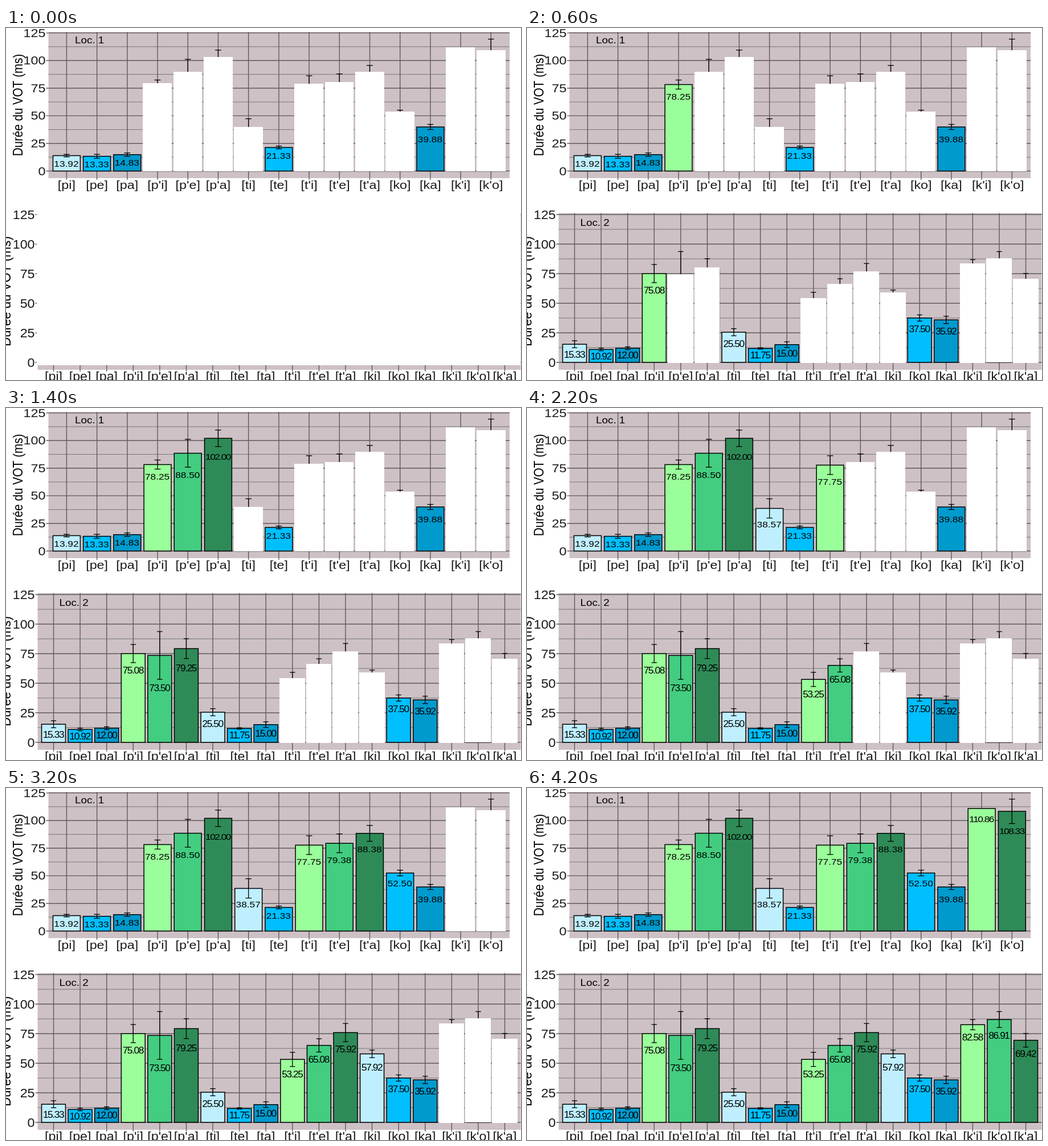
Animation, 904 px wide and 619 px high, one loop 4.4 s. Source, as an HTML page with a canvas:

```html
<!DOCTYPE html>
<html lang="fr">
<head>
<meta charset="utf-8">
<title>Durée du VOT</title>
<style>
  html, body { margin: 0; height: 100%; overflow: hidden; background: #fff; }
  canvas { display: block; }
</style>
</head>
<body>
<canvas id="stage" width="904" height="619"></canvas>
<script>
const ctx = document.getElementById('stage').getContext('2d');
const STEP = 200, LOOP = 4400;
const PLAIN = ['#bfefff', '#00bfff', '#009acd'];
const EJECTIVE = ['#9aff9a', '#43cd80', '#2e8b57'];
const SHADE = { i: 0, e: 1, o: 1, a: 2 };

// bars: syllable, mean, error half-height (px), label offset below top (px), reveal step, shade
const charts = [
  {
    title: 'Loc. 1', titleX: 121, titleY: 27, start: 0,
    left: 74.5, right: 884, top: 7, bottom: 264, base: 251.5, unit: 1.943,
    firstX: 106.4, pitch: 53.21, coverBottom: 252,
    stretch: 1.15, tickSize: 20.3, valueSize: 15, titleSize: 16.4, spacing: 0,
    axisSize: 20.6, axisX: 28.5, axisY: 135.5, tickX: 69.5, nameY: 282.5,
    bars: [
      ['pi', 13.92, 2.2, 14], ['pe', 13.33, 3.5, 14], ['pa', 14.83, 3, 14],
      ["p'i", 78.25, 8, 21, 3], ["p'e", 88.5, 24.5, 38, 5], ["p'a", 102, 14.5, 32, 7],
      ['ti', 38.57, 17, 28, 8], ['te', 21.33, 2.5, 15],
      ["t'i", 77.75, 16.5, 29.5, 10], ["t'e", 79.38, 16.5, 29, 12], ["t'a", 88.38, 14, 27.5, 14],
      ['ko', 52.5, 5, 18, 16], ['ka', 39.88, 4.5, 21.5],
      ["k'i", 110.86, 0, 18.5, 18], ["k'o", 108.33, 21.5, 35, 20, 2]
    ]
  },
  {
    title: 'Loc. 2', titleX: 93.5, titleY: 348, start: 1,
    left: 55.5, right: 903.5, top: 325.5, bottom: 601, base: 588, unit: 2.08,
    firstX: 83.5, pitch: 46.59, coverBottom: 589,
    stretch: 1.08, tickSize: 21.5, valueSize: 16, titleSize: 17.4, spacing: -1.3,
    axisSize: 22.2, axisX: 8, axisY: 463, tickX: 50.5, nameY: 619.5,
    bars: [
      ['pi', 15.33, 6.2, 18], ['pe', 10.92, 2.3, 12], ['pa', 12, 2.5, 12.5],
      ["p'i", 75.08, 16, 30, 2], ["p'e", 73.5, 42, 57, 4], ["p'a", 79.25, 17.5, 34, 6],
      ['ti', 25.5, 6.3, 20], ['te', 11.75, 1.2, 11.5], ['ta', 15, 5, 16],
      ["t'i", 53.25, 12.5, 26, 9], ["t'e", 65.08, 11.7, 25, 11], ["t'a", 75.92, 16, 29, 13],
      ['ki', 57.92, 6.7, 23.5, 15], ['ko', 37.5, 5.5, 19], ['ka', 35.92, 6.5, 20.5],
      ["k'i", 82.58, 9, 22, 17], ["k'o", 86.91, 14, 28, 19], ["k'a", 69.42, 12, 23.5, 21]
    ]
  }
];

function line(x1, y1, x2, y2, color, width) {
  ctx.strokeStyle = color;
  ctx.lineWidth = width;
  ctx.beginPath();
  ctx.moveTo(x1, y1);
  ctx.lineTo(x2, y2);
  ctx.stroke();
}

function rect(x1, y1, x2, y2, color) {
  ctx.fillStyle = color;
  ctx.fillRect(x1, y1, x2 - x1, y2 - y1);
}

function text(chart, str, x, y, size, { align = 'center', spacing = 0, angle = 0, color = '#000' } = {}) {
  ctx.save();
  ctx.translate(x, y);
  ctx.scale(chart.stretch, 1);
  ctx.rotate(angle);
  ctx.font = `${size}px "Liberation Sans", Arial, sans-serif`;
  ctx.letterSpacing = spacing + 'px';
  ctx.textAlign = align;
  ctx.fillStyle = color;
  ctx.fillText(str, 0, 0);
  ctx.restore();
}

function drawPanel(c) {
  const yAt = v => c.base - v * c.unit;
  rect(c.left, c.top, c.right, c.bottom, '#cdc1c5');
  for (let v = 12.5; v < 125; v += 25) line(c.left, yAt(v), c.right, yAt(v), '#777', 1);
  for (let v = 0; v <= 125; v += 25) {
    line(c.left - 4, yAt(v), c.right, yAt(v), '#5e5a5c', 1.4);
    text(c, String(v), c.tickX, yAt(v) + c.tickSize * 0.35, c.tickSize, { align: 'right', color: '#1a1a1a' });
  }
  c.bars.forEach(([name], i) => {
    const x = c.firstX + i * c.pitch;
    line(x, c.top, x, c.bottom + 3, '#5e5a5c', 1.4);
    text(c, `[${name}]`, x, c.nameY, c.tickSize, { color: '#1a1a1a' });
  });
  text(c, c.title, c.titleX, c.titleY, c.titleSize, { align: 'left' });
  text(c, 'Durée du VOT (ms)', c.axisX, c.axisY, c.axisSize, { angle: -Math.PI / 2 });
}

function drawBar(c, [name, mean, error, offset, , shade = SHADE[name.at(-1)]], x) {
  const y = c.base - mean * c.unit, half = c.pitch * 0.45, cap = c.pitch * 0.1;
  rect(x - half, y, x + half, c.base, (name.includes("'") ? EJECTIVE : PLAIN)[shade]);
  ctx.strokeStyle = '#000';
  ctx.lineWidth = 1.5;
  ctx.strokeRect(x - half, y, half * 2, c.base - y);
  if (error) {
    line(x, y - error, x, y + error, '#000', 1.3);
    for (const end of [y - error, y + error]) line(x - cap, end, x + cap, end, '#000', 1.3);
  }
  const spacing = mean >= 100 ? -1.3 : c.spacing;
  text(c, mean.toFixed(2), x - 0.5, y + offset + c.valueSize * 0.35, c.valueSize, { spacing });
}

function drawCover(c, [name, mean], x) {
  const half = c.pitch * 0.483;
  const keepsBaseline = c.start === 1 && name === "k'o";
  rect(Math.round(x - half), Math.floor(c.base - mean * c.unit - 1.8),
    Math.floor(x + half), c.coverBottom - keepsBaseline, '#fff');
}

function draw(now) {
  const step = Math.floor(now % LOOP / STEP);
  rect(0, 0, 904, 619, '#fff');
  for (const c of charts) {
    drawPanel(c);
    c.bars.forEach((bar, i) => {
      const x = c.firstX + i * c.pitch;
      drawBar(c, bar, x);
      if (step < (bar[4] || 0)) drawCover(c, bar, x);
    });
    if (step < c.start) rect(54, 325, 903, 593, '#fff');
  }
  requestAnimationFrame(draw);
}
requestAnimationFrame(draw);
</script>
</body>
</html>
```
